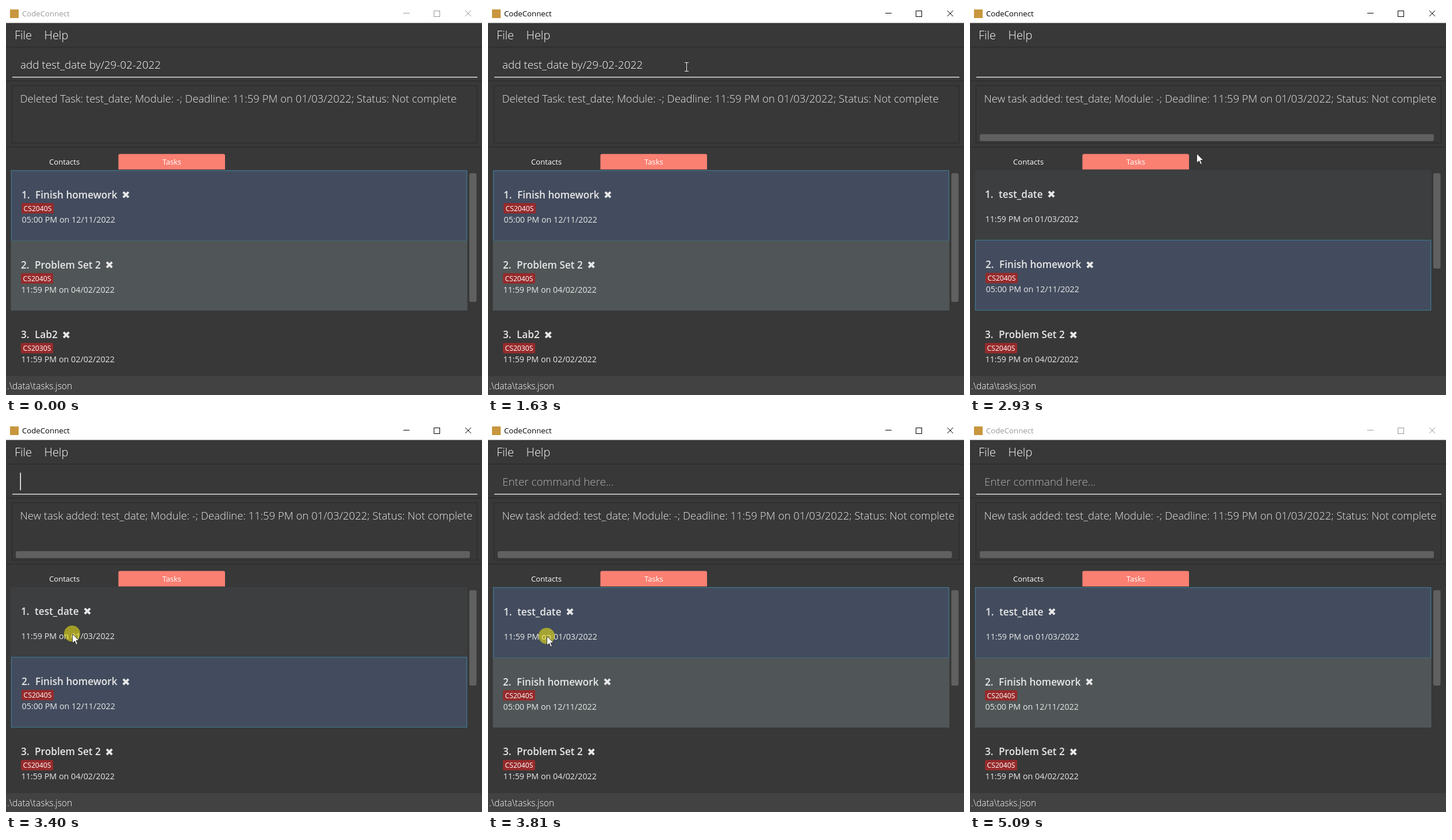
An HTML page with a canvas for the animation above (5160 ms loop, 828 px wide and 677 px high).

```html
<!DOCTYPE html>
<html lang="en">
<head>
<meta charset="utf-8">
<title>Task list</title>
<style>
  html, body { margin: 0; width: 100%; height: 100%; overflow: hidden; background: #383838; }
  canvas { display: block; }
</style>
</head>
<body>
<canvas id="stage" width="828" height="677"></canvas>
<script>
const ctx = document.getElementById('stage').getContext('2d');
const LOOP = 5160;
const BLINK = 500, FOCUS = 1130, SUBMIT = 2150, RELAYOUT = 2250;
const PRESS = 3400, SELECT = PRESS + 20, RELEASE = 4250, BLUR = 5090;
const SANS = '"Open Sans", "Noto Sans", sans-serif';
const LINE = '#282828', BAR = '#606060', SOFT = '#e8e8e8';
const SELECTED_H = 123, ROW_H = 121.5;

const DUE = '11:59 PM on 01/03/2022';
const STATUS = `test_date; Module: -; Deadline: ${DUE}; Status: Not`;
const test = { name: 'test_date', due: DUE };
const homework = { name: 'Finish homework', tag: 'CS2040S', due: '05:00 PM on 12/11/2022' };
const problems = { name: 'Problem Set 2', tag: 'CS2040S', due: '11:59 PM on 04/02/2022' };
const lab = { name: 'Lab2', tag: 'CS2030S', due: '11:59 PM on 02/02/2022' };

// The pointer moves in arcs: each bends towards one point on its way to the next stop
const pt = (x, y) => ({ x, y });
const taskbar = pt(783, 675), below = pt(262, 137), field = pt(345, 106);
const date = pt(114, 367), dateLeft = pt(101, 371), dateMid = pt(148, 367), right = pt(707, 183);
const linear = u => u;
const easeOut = u => u * (2 - u);
const arcs = [
  { start: 140, end: 600, from: taskbar, bend: pt(560, 390), to: below, ease: linear },
  { start: 700, end: 1080, from: below, bend: pt(310, 106), to: field, ease: easeOut },
  { start: 2870, end: PRESS, from: field, bend: pt(520, 515), to: date, ease: easeOut },
  { start: PRESS, end: 3810, from: date, bend: pt(220, 368), to: dateLeft, ease: linear },
  { start: 3810, end: 4210, from: dateLeft, bend: pt(230, 369), to: dateMid, ease: linear },
  { start: 4210, end: 4400, from: dateMid, bend: pt(420, 320), to: right, ease: linear },
  { start: 4490, end: 4890, from: right, bend: pt(612, 526), to: taskbar, ease: linear }
];

function pointerAt(t) {
  const arc = arcs.filter(a => t >= a.start).pop();
  if (!arc || t >= arcs[arcs.length - 1].end) return null;
  const u = arc.ease(Math.min((t - arc.start) / (arc.end - arc.start), 1)), v = 1 - u;
  const at = k => v * v * arc.from[k] + 2 * u * v * arc.bend[k] + u * u * arc.to[k];
  return pt(at('x'), at('y'));
}

function text(str, x, y, size, color = '#fff', weight = 400) {
  ctx.font = `${weight} ${size}px ${SANS}`;
  ctx.fillStyle = color;
  ctx.fillText(str, x, y);
  return x + ctx.measureText(str).width;
}

const light = (str, x, y, size, color = '#fff') => text(str, x, y, size, color, 300);

function box(x, y, w, h, color, radius = 0) {
  ctx.fillStyle = color;
  ctx.beginPath();
  ctx.roundRect(x, y, w, h, radius);
  ctx.fill();
}

function frame(x, y, w, h, color) {
  ctx.strokeStyle = color;
  ctx.lineWidth = 1;
  ctx.strokeRect(x, y, w, h);
}

function titleBar(active) {
  const ink = active ? '#000' : '#999';
  box(0, 0, 828, 29.5, '#fff');
  box(7, 6, 15, 15, '#c8963e');
  text('CodeConnect', 28, 18, 13.2, ink);
  box(691, 12, 11, 1, ink);
  frame(744.5, 8.5, 10, 10, ink);
  ctx.beginPath();
  for (const side of [-5, 5]) {
    ctx.moveTo(804 - side, 8);
    ctx.lineTo(804 + side, 18);
  }
  ctx.stroke();
}

function chrome() {
  box(0, 29, 828, 648, '#383838');
  light('File', 15, 58, 20);
  light('Help', 66.5, 58, 20);
  for (const y of [71, 130, 245]) box(0, y, 828, 1, LINE);
  box(11, 123.25, 809, 1.25, '#fff');
  frame(10.5, 138.5, 809, 100, LINE);
  text('Contacts', 75, 276, 13.1);
  box(195.5, 257.5, 185.5, 27, '#fa8072', [3, 3, 0, 0]);
  text('Tasks', 272, 276, 13.1);
  box(0, 644, 828, 33, '#424242');
  light('.\\data\\tasks.json', 2, 667, 15.5);
}

// The caret restarts its blink on focus and after each command
function caretOn(t) {
  const since = t < SUBMIT ? t - FOCUS : t - RELAYOUT + 60;
  const idle = t < FOCUS || t >= SELECT || (t >= SUBMIT && t < RELAYOUT);
  return !idle && Math.floor(since / BLINK) % 2 === 0;
}

function commandBox(t) {
  let end = 25;
  if (t < SUBMIT) end = light('add test_date by/29-02-2022', 25, 108.5, 18.9);
  else if (t >= SELECT) light('Enter command here...', 25, 108.5, 18.9, '#b4b4b4');
  if (caretOn(t)) box(end - 0.5, 86.5, 1.5, 30.5, '#fff');
}

function resultBox(t) {
  const wrapped = t >= SUBMIT && t < RELAYOUT;
  const lead = t < SUBMIT ? 'Deleted Task: ' : 'New task added: ';
  light(lead + STATUS + (wrapped ? '' : ' complete'), 24.5, 167.5, 18.5, SOFT);
  if (wrapped) light('complete', 24.5, 198, 18.5, SOFT);
  if (t >= RELAYOUT) box(17, 223, 790, 12, BAR, 3);
}

function row(task, i, top, selected) {
  const plain = i === 1 ? '#505657' : i ? '#383838' : '#3c3e3f';
  box(8.5, top, 794, selected ? SELECTED_H : ROW_H, selected ? '#434c5e' : plain);
  if (selected) frame(9.5, Math.round(top) + 0.5, 792, 122, '#3e7b91');
  ctx.save();
  ctx.translate(26 + selected, top + selected);
  const gap = text(`${i + 1}.`, 0, 48, 17.2, SOFT, 600);
  const end = text(task.name, gap + 9.5, 48, 17.2, SOFT, 600);
  ctx.font = '18px "DejaVu Sans", sans-serif';
  ctx.fillText('\u2716', end + 7.5, 48.5);
  if (task.tag) {
    box(0, 56.5, 56, 18, '#972a2b', 2);
    text(task.tag, 3.5, 70, 12.2);
  }
  text(task.due, 0.5, 90, 14.3, SOFT);
  ctx.restore();
}

function list(t) {
  const old = t < SUBMIT;
  const tasks = old ? [homework, problems, lab] : [test, homework, problems];
  const chosen = old || t >= SELECT ? 0 : 1;
  ctx.save();
  ctx.beginPath();
  ctx.rect(0, 285, 828, 359);
  ctx.clip();
  let top = 285.5;
  tasks.forEach((task, i) => {
    row(task, i, top, i === chosen);
    top += i === chosen ? SELECTED_H : ROW_H;
  });
  ctx.restore();
  box(806, 291, 12.5, old ? 224 : 166, BAR, 3);
}

const arrowShape = new Path2D('M0 0V16L4 12.5L6.5 18.5L9 17.5L6.5 11.5H11.5Z');

function arrow() {
  ctx.fillStyle = '#fff';
  ctx.fill(arrowShape);
  ctx.strokeStyle = '#222';
  ctx.lineWidth = 0.9;
  ctx.stroke(arrowShape);
}

function beam() {
  box(-0.5, -7, 1, 15, SOFT);
  for (const y of [-8, 7]) box(-3.5, y, 7, 1, SOFT);
}

function pointer(t) {
  const p = pointerAt(t);
  if (!p) return;
  ctx.save();
  ctx.translate(Math.round(p.x) + 0.5, Math.round(p.y));
  const pressed = (t >= FOCUS - 30 && t < FOCUS + 30) || (t >= PRESS && t < RELEASE);
  if (pressed) box(-14.5, -14.5, 28, 28, 'rgba(255, 245, 15, 0.52)', 14);
  if (p.y > 80 && p.y < 125) beam(); else arrow();
  ctx.restore();
}

function draw(t) {
  chrome();
  titleBar(t >= FOCUS && t < BLUR);
  commandBox(t);
  resultBox(t);
  list(t);
  pointer(t);
}

const start = performance.now();
function tick() {
  draw((performance.now() - start) % LOOP);
  requestAnimationFrame(tick);
}
tick();
</script>
</body>
</html>
```
